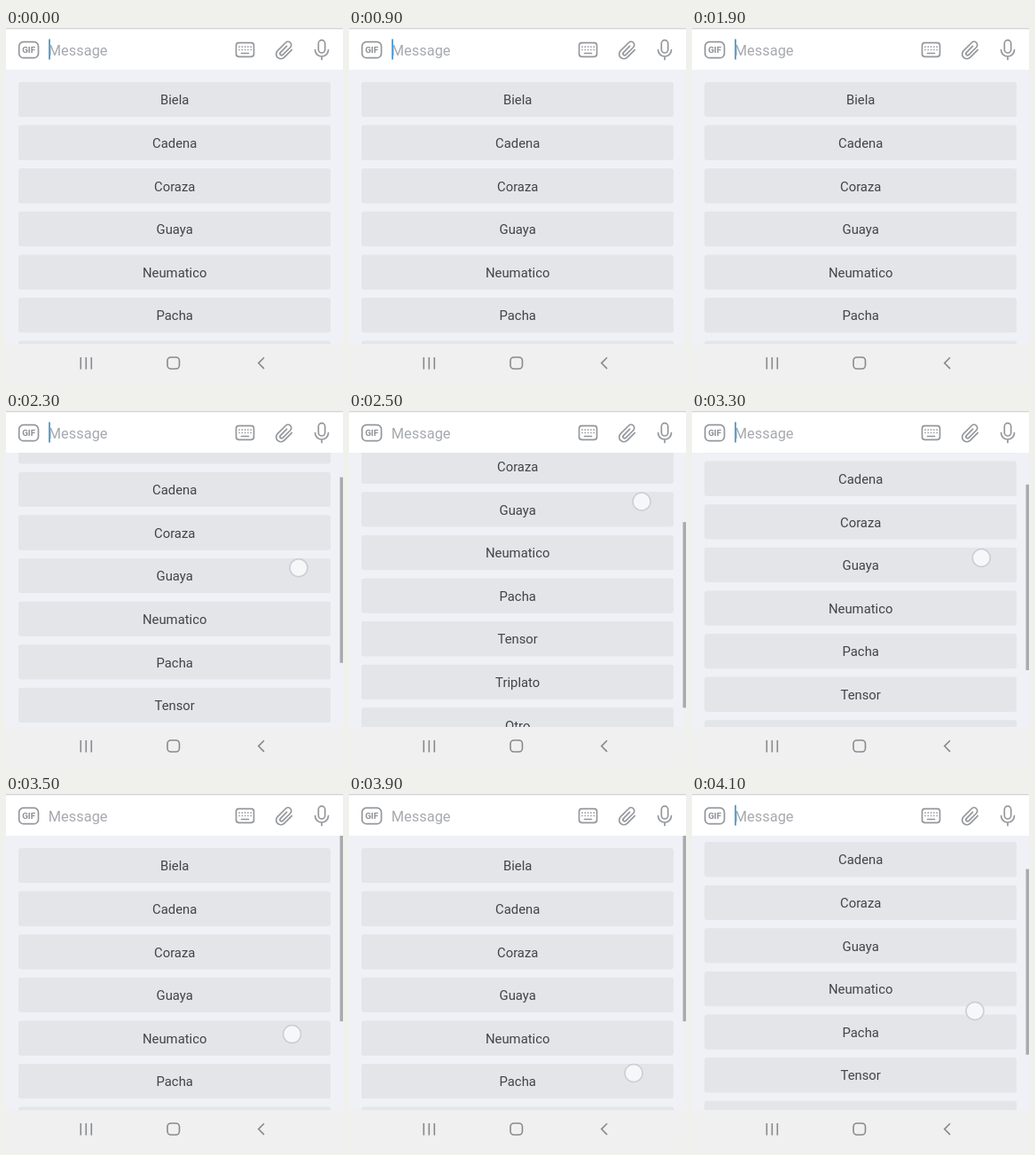
Animation of 380x400 px, one loop 4.2 s. Source, as an HTML page:

```html
<!DOCTYPE html>
<html lang="es">
<head>
<meta charset="utf-8">
<style>
  html, body { margin: 0; width: 100%; height: 100%; overflow: hidden; background: #fff; }
  svg { display: block; width: 380px; height: 400px; font-family: Roboto, sans-serif; }
  .line { fill: none; stroke: #94979c; stroke-width: 1.7; stroke-linecap: round; stroke-linejoin: round; }
  .nav { fill: none; stroke: #88898d; stroke-width: 1.6; }
  .row rect { fill: #e3e5e9; }
  .row text { font-size: 14.85px; fill: #414448; text-anchor: middle; }
</style>
</head>
<body>
<svg viewBox="0 0 380 400">
  <defs><clipPath id="view"><rect y="47" width="380" height="309"/></clipPath></defs>
  <rect width="380" height="400" fill="#fff"/>
  <rect y="47" width="380" height="309" fill="#eff1f6"/>
  <g clip-path="url(#view)">
    <g id="list"></g>
    <rect id="thumb" x="376.5" width="3.5" fill="#a9aaad"/>
  </g>

  <!-- input bar -->
  <rect width="380" height="1.3" fill="#d3d4d6"/>
  <rect class="line" x="14.7" y="15.7" width="21.8" height="18" rx="5"/>
  <text x="25.6" y="28.3" font-size="9.8" font-weight="700" fill="#8b8e94" text-anchor="middle">GIF</text>
  <text x="47.8" y="30.5" font-size="16.4" fill="#a6a9ae">Message</text>
  <rect id="caret" x="48" y="12.5" width="2" height="23" fill="#5ba3d3"/>
  <rect class="line" x="259.5" y="16.7" width="20" height="15.6" rx="3"/>
  <path class="line" stroke-dasharray="0 3.3" d="M263 21.2H277M263 24.5H277"/>
  <path class="line" d="M265.5 28.5H273.5"/>
  <path class="line" transform="translate(314.2 25.2) rotate(45)"
    d="M5.3-6V6a5.3 5.3 0 0 1-10.6 0V-7a3.7 3.7 0 0 1 7.4 0V5a1.9 1.9 0 0 1-3.8 0V-5"/>
  <rect class="line" x="352.3" y="13.7" width="7.4" height="14.3" rx="3.7"/>
  <path class="line" d="M348.5 24.5a7.5 7.5 0 0 0 15 0M356 32V35.5"/>

  <!-- navigation bar -->
  <rect y="356" width="380" height="44" fill="#f0f0f0"/>
  <path class="nav" d="M84.3 371V384.5M90.3 371V384.5M96.3 371V384.5"/>
  <rect class="nav" x="182" y="371" width="13.5" height="13" rx="4"/>
  <path class="nav" d="M291 371.3L284.7 377.6L291 383.9"/>

  <circle id="touch" r="10" fill="#f6f7f9" stroke="#cccdd4" stroke-width="1.5"/>
</svg>
<script>
  const LOOP = 4200, TICK = 100, TOP = 47, VIEW = 309, CONTENT = 456.5, PITCH = 48.6;
  const names = ["Biela", "Cadena", "Coraza", "Guaya", "Neumatico", "Pacha", "Tensor", "Triplato", "Otro"];
  const easeOut = p => 1 - (1 - p) ** 2;
  const smooth = p => p * p * (3 - 2 * p);
  const linear = p => p;
  // the list follows the finger: scroll = grip - finger height
  const swipes = [
    { begin: 2200, time: 600, from: [330, 228], to: [330, 60], grip: 217.5, ease: easeOut },
    { begin: 3000, time: 680, from: [330, 61], to: [321, 314.5], grip: 218.5, ease: smooth },
    { begin: 3900, time: 200, from: [321, 314.5], to: [319, 244.5], grip: 300, ease: linear }
  ];
  const $ = id => document.getElementById(id);
  const set = (el, attrs) => Object.entries(attrs).forEach(([k, v]) => el.setAttribute(k, v));
  const show = (el, on) => set(el, { visibility: on ? "visible" : "hidden" });
  const clamp = (v, max) => Math.min(Math.max(v, 0), max);
  const list = $("list"), thumb = $("thumb"), touch = $("touch"), caret = $("caret");

  list.innerHTML = names.map((name, i) => `<g class="row" transform="translate(0 ${61 + i * PITCH})">
    <rect x="14" width="352" height="39.3" rx="3"/><text x="190.2" y="25.4">${name}</text></g>`).join("");
  set(thumb, { height: VIEW * VIEW / CONTENT });

  function draw(now) {
    const t = Math.floor(now % LOOP / TICK) * TICK;
    const swipe = swipes.findLast(s => s.begin <= t);
    let scroll = 0;
    if (swipe) {
      const { begin, time, from, to, grip, ease } = swipe;
      const p = ease(clamp((t - begin) / time, 1));
      const [x, y] = from.map((v, i) => v + (to[i] - v) * p);
      scroll = clamp(grip - y, CONTENT - VIEW);
      set(touch, { cx: x, cy: y });
    }
    set(list, { transform: `translate(0 ${-scroll})` });
    set(thumb, { y: TOP + scroll * VIEW / CONTENT });
    show(touch, swipe);
    show(thumb, swipe);
    show(caret, (t + 150) % 1020 < 510);
  }

  const start = performance.now();
  function tick() {
    draw(performance.now() - start);
    requestAnimationFrame(tick);
  }
  tick();
</script>
</body>
</html>
```
